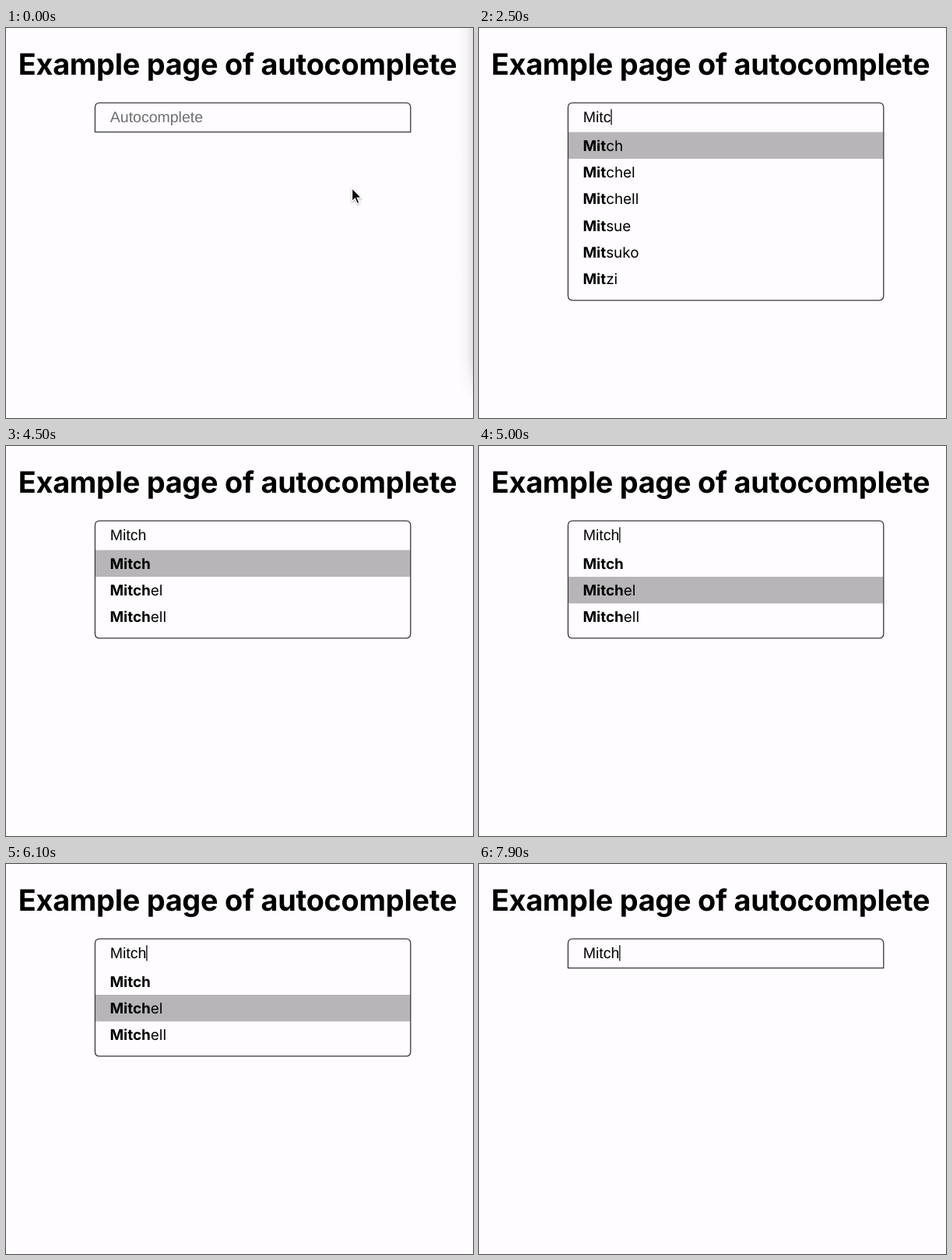
These frames come from a looping animation (600x501 px, 8 s). An HTML page:

```html
<!DOCTYPE html>
<html lang="en">
<head>
<meta charset="utf-8">
<title>Autocomplete</title>
<style>
  html, body { margin: 0; width: 100%; height: 100%; overflow: hidden; background: #fefcff; }
  svg { display: block; text-rendering: geometricPrecision; }
  .title { font: 700 37.8px Inter, sans-serif; font-optical-sizing: none; letter-spacing: -.24px; text-anchor: middle; }
  .field { font: 19.5px "Liberation Sans", Arial, sans-serif; }
  .row { font: 400 18.9px Inter, sans-serif; font-optical-sizing: none; }
  .hit { font-weight: 700; }
  .edge { fill: none; stroke: #38373a; stroke-width: 1.3; }
  .arrow { stroke: #fff; stroke-width: 1.4; filter: drop-shadow(0 1px 1px rgba(0, 0, 0, .35)); }
  .beam { fill: none; stroke-linecap: round; }
</style>
</head>
<body>
<svg width="600" height="501">
  <defs>
    <linearGradient id="side">
      <stop offset="0" stop-color="#777" stop-opacity="0"/>
      <stop offset=".6" stop-color="#777" stop-opacity=".06"/>
      <stop offset="1" stop-color="#777" stop-opacity=".22"/>
    </linearGradient>
    <linearGradient id="fade" x2="0" y2="1">
      <stop offset=".88" stop-color="#fff"/>
      <stop offset="1" stop-color="#000"/>
    </linearGradient>
    <mask id="low"><rect x="580" width="20" height="480" fill="url(#fade)"/></mask>
    <path id="ibeam" d="M-4-9Q-.5-9 0-6.5Q.5-9 4-9M0-6.5V6.5M-4 9Q-.5 9 0 6.5Q.5 9 4 9M-2 3H2"/>
  </defs>

  <rect id="shade" x="580" width="20" height="480" fill="url(#side)" mask="url(#low)"/>
  <text class="title" x="297.5" y="59.7">Example page of autocomplete</text>

  <rect id="mark" x="115" width="404.5" height="34.3" fill="#b7b5b8"/>
  <g id="rows"></g>
  <path id="edge" class="edge"/>

  <text id="field" class="field" x="133.8" y="121"></text>
  <rect id="caret" y="104.3" width="1.3" height="20.2"/>

  <path id="arrow" class="arrow" d="M0 0V17.2L3.9 13.6 6.8 20.2 9.6 19 6.8 12.6H12Z"/>
  <g id="beam" class="beam">
    <use href="#ibeam" stroke="#fff" stroke-width="3"/>
    <use href="#ibeam" stroke="#000" stroke-width="1.4"/>
  </g>
</svg>
<script>
const LOOP = 8000, LEFT = 133.8, TOP = 133.7, PITCH = 34.3;
const NAMES = ["Mitch", "Mitchel", "Mitchell", "Mitsue", "Mitsuko", "Mitzi"];

// Each timeline holds [start in ms, value], and the value stays until the next start.
const typed = [[0, ""], [1600, "M"], [1900, "Mi"], [2200, "Mit"], [2500, "Mitc"], [2800, "Mitch"],
  [3000, "Mitcha"], [4100, "Mitch"], [6500, "Mitchel"], [7700, "Mitche"], [7900, "Mitch"]];
const query = [[0, ""], [2500, "Mit"], [2800, "Mitc"], [3300, ""], [4400, "Mitch"], [6500, ""]];
const active = [[0, 0], [5000, 1], [5200, 2], [6100, 1]];
const blink = [[0, null], [1000, 1000], [1600, 1600], [1900, 1900], [2200, 2200],
  [2500, 2500], [2800, 2800], [3000, 3000], [6500, 6500]];
const mouse = [[0, ["arrow", 444.5, 205.5]], [100, ["arrow", 277, 73]],
  [400, ["beam", 287, 108]], [500, ["beam", 294, 122]],
  [800, ["beam", 283, 119]], [900, ["beam", 260, 114]], [1000, ["beam", 247, 111.3]], [1600, null],
  [6900, ["beam", 233, 112]], [7000, ["beam", 223, 112]], [7100, ["beam", 213, 112]],
  [7200, ["beam", 207, 112]], [7700, null]];

const el = id => document.getElementById(id);
const show = (node, on) => node.setAttribute("visibility", on ? "visible" : "hidden");
const at = (line, t) => line.reduce((v, step) => step[0] <= t ? step[1] : v, null);

function svg(tag, cls, parent) {
  const node = document.createElementNS("http://www.w3.org/2000/svg", tag);
  node.setAttribute("class", cls);
  return parent.appendChild(node);
}

const rows = NAMES.map((name, i) => {
  const text = svg("text", "row", el("rows"));
  text.setAttribute("x", LEFT - .3);
  text.setAttribute("y", TOP + PITCH * i + 24.1);
  return { name, text, hit: svg("tspan", "hit", text), rest: svg("tspan", "rest", text) };
});

function drawList(word, index) {
  let count = 0;
  for (const row of rows) {
    const on = word !== "" && row.name.startsWith(word);
    show(row.text, on);
    if (!on) continue;
    count++;
    row.hit.textContent = word;
    row.rest.textContent = row.name.slice(word.length);
  }
  show(el("mark"), count > 0);
  el("mark").setAttribute("y", TOP + PITCH * index);
  const roof = "V102.2Q114.4 96.2 120.4 96.2H513.8Q519.8 96.2 519.8 102.2V";
  const end = TOP + PITCH * count + 10.3;
  el("edge").setAttribute("d", count
    ? `M114.4 ${end - 6}${roof}${end - 6}Q519.8 ${end} 513.8 ${end}H120.4Q114.4 ${end} 114.4 ${end - 6}Z`
    : `M114.4 ${TOP}${roof}${TOP}Z`);
}

function drawField(text, since, t) {
  const field = el("field");
  field.textContent = text || "Autocomplete";
  field.setAttribute("fill", text ? "#000" : "#6f6e71");
  const width = text ? field.getComputedTextLength() : 0;
  el("caret").setAttribute("x", LEFT + width - .2);
  show(el("caret"), since !== null && Math.floor((t - since) / 500) % 2 === 0);
}

function drawMouse(pose) {
  for (const id of ["arrow", "beam"]) {
    const on = pose !== null && pose[0] === id;
    show(el(id), on);
    if (on) el(id).setAttribute("transform", `translate(${pose[1]} ${pose[2]})`);
  }
}

const start = performance.now();
function frame() {
  const t = (performance.now() - start) % LOOP;
  show(el("shade"), t < 300);
  drawList(at(query, t), at(active, t));
  drawField(at(typed, t), at(blink, t), t);
  drawMouse(at(mouse, t));
  requestAnimationFrame(frame);
}
frame();
</script>
</body>
</html>
```
